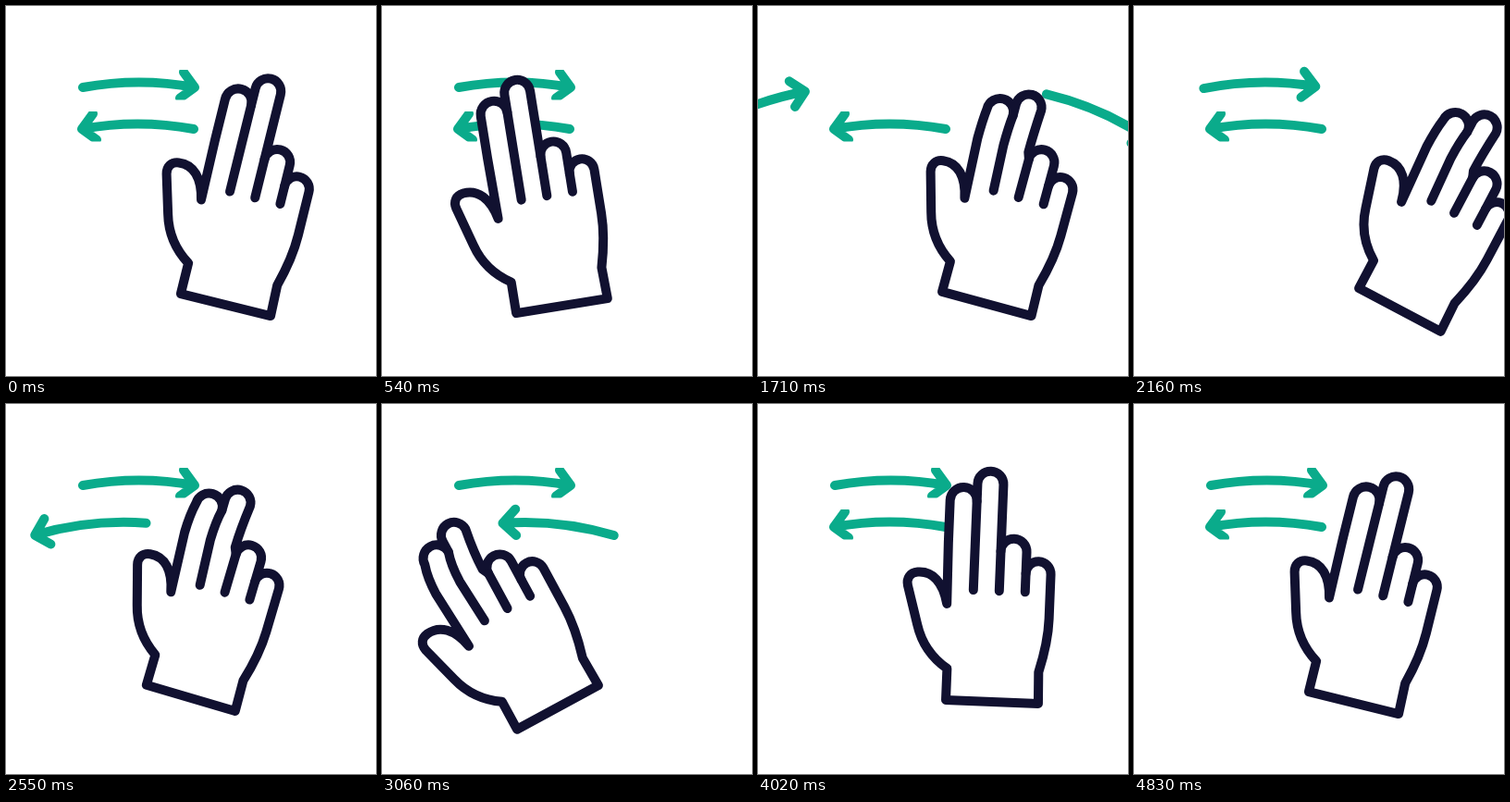
Write an HTML page with a canvas that moves like this. It is 400 px wide and 400 px high and loops after 6550 ms.

```html
<!DOCTYPE html>
<html lang="en">
<head>
<meta charset="utf-8">
<title>Two-finger swipe</title>
<style>
html, body { margin: 0; width: 100%; height: 100%; overflow: hidden; background: #fff; }
canvas { display: block; }
</style>
</head>
<body>
<canvas width="400" height="400"></canvas>
<script>
const ctx = document.querySelector('canvas').getContext('2d');
const LOOP = 6550, STEP = 30, MOTION_END = 4830;
const NAVY = '#111130', GREEN = '#0aab8b';
const RAD = Math.PI / 180;

// Palm position and tilt: time, x, y, degrees
const handKeys = [
  [0, 261.5, 226, 13.9], [330, 218, 223, 2], [660, 159, 228, -13],
  [1080, 119, 247, -15.2], [1200, 119, 248, -14], [1320, 130, 244, -11],
  [1710, 273.5, 225.5, 15.2], [2080, 338, 241, 28], [2300, 315, 236, 27],
  [2550, 228, 222, 16.4], [2800, 172, 231, -10], [3060, 142.4, 240, -28.4],
  [3330, 131, 240, -29], [3700, 185, 227, -18], [4020, 257, 222, 2.3],
  [4350, 278, 228, 20], [4620, 266, 226.5, 15.5], [4830, 261.5, 226, 13.9]
];
// Finger bend and sideways shift of the fingertips
const fingerKeys = [
  [700, 0, 0], [1060, 1, -8], [1250, 1, -8], [1710, 1, -1],
  [2550, 1, 0], [3060, 1, 1], [3250, 1, 1], [3700, 0, 0]
];
// Share of one swipe that an arrow has travelled
const swipeKeys = [[0, 0], [150, 0.137], [390, 0.6], [660, 0.871], [930, 1]];

// Smooth interpolation that never overshoots its keys
function track(keys, t, col) {
  const last = keys.length - 1;
  if (t <= keys[0][0]) return keys[0][col];
  if (t >= keys[last][0]) return keys[last][col];
  const i = keys.findIndex(k => k[0] > t) - 1;
  const slope = j => (keys[j + 1][col] - keys[j][col]) / (keys[j + 1][0] - keys[j][0]);
  const tangent = j => {
    if (j === 0 || j === last) return 0;
    const a = slope(j - 1), b = slope(j);
    return a * b <= 0 ? 0 : 2 * a * b / (a + b);
  };
  const span = keys[i + 1][0] - keys[i][0];
  const u = (t - keys[i][0]) / span, v = 1 - u;
  return v * v * (1 + 2 * u) * keys[i][col] + u * u * (3 - 2 * u) * keys[i + 1][col]
    + span * u * v * (v * tangent(i) - u * tangent(i + 1));
}

const arrowPath = new Path2D('M-61 0Q0 -11 60 0M48 -16.5L60 0L44 11.5');

function drawArrowAt(distance) {
  ctx.save();
  ctx.translate(144 + distance, 88 + distance ** 2 * (0.00095 - 0.0000014 * distance));
  ctx.rotate(distance * (0.126 - 0.00009 * distance) * RAD);
  ctx.stroke(arrowPath);
  ctx.restore();
}

function drawArrow(progress) {
  const travel = 373;
  if (progress > 0 && progress < 1) {
    drawArrowAt(progress * travel);
    drawArrowAt((progress - 1) * travel);
    return;
  }
  // A resting arrow has its barbs cut flat
  ctx.save();
  ctx.beginPath();
  ctx.rect(70, 69, 150, 32.5);
  ctx.clip();
  drawArrowAt(0);
  ctx.restore();
}

function drawHand(t) {
  const bend = track(fingerKeys, t, 1), tip = track(fingerKeys, t, 2);
  const joint = -3 * bend - 0.5 * tip;
  const middleY = -235 + 18 * bend, indexY = -216 + 12 * bend;
  const up = (x, y) => `L${x + joint} -170Q${x + joint} -190 ${x + tip} ${y}`;
  const down = x => `Q${x + joint} -190 ${x + joint} -170`;

  const outline = new Path2D(
    'M0 0L0 -34C-14 -43 -28 -58 -34 -80L-46 -122' +
    'C-48 -130 -44 -136 -36 -137C-20 -139 -8 -127 -3 -104' + up(-4, indexY) +
    `A14.5 14.5 0 0 1 ${25 + tip} ${indexY}L${25 + tip} ${middleY}` +
    `A14 14 0 0 1 ${53 + tip} ${middleY}` + down(53) +
    'L53 -163A14 14 0 0 1 81 -163L81 -140A13.5 13.5 0 0 1 108 -140' +
    'L108 -92C108 -70 104 -52 99 -34L100 0Z');
  const creases = new Path2D(
    'M25 -120' + up(25, indexY) + 'M53 -120L53 -163M81 -120L81 -140');

  ctx.save();
  ctx.translate(track(handKeys, t, 1), track(handKeys, t, 2));
  ctx.rotate(track(handKeys, t, 3) * RAD);
  ctx.translate(-50, 100);
  ctx.fillStyle = '#fff';
  ctx.strokeStyle = NAVY;
  ctx.fill(outline);
  ctx.stroke(outline);
  ctx.stroke(creases);
  ctx.restore();
}

function draw(now) {
  const t = Math.min(MOTION_END, Math.floor(now % LOOP / STEP) * STEP);
  ctx.fillStyle = '#fff';
  ctx.fillRect(0, 0, 400, 400);
  ctx.lineWidth = 10;
  ctx.lineCap = ctx.lineJoin = 'round';
  ctx.strokeStyle = GREEN;
  drawArrow(track(swipeKeys, t - 1320, 1));
  ctx.save();
  ctx.translate(286, 45);
  ctx.scale(-1, 1);
  drawArrow(track(swipeKeys, t - 2400, 1));
  ctx.restore();
  drawHand(t);
}

function frame() {
  draw(performance.now());
  requestAnimationFrame(frame);
}
frame();
</script>
</body>
</html>
```
